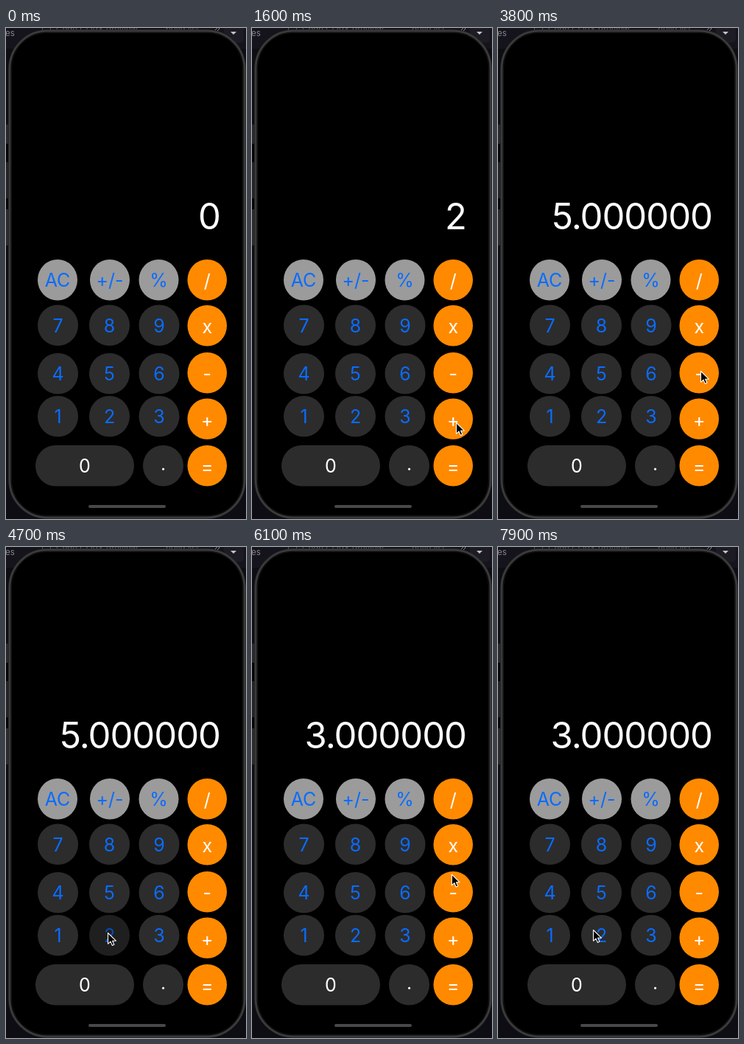
An HTML page for the animation above (8 s loop, 326 by 666 pixels).

```html
<!DOCTYPE html>
<html lang="en">
<head>
<meta charset="utf-8">
<title>Calculator</title>
<style>
  html, body { margin: 0; width: 100%; height: 100%; overflow: hidden; background: #15141c; }
  svg { display: block; width: 326px; height: 666px; }
  text { font-family: Inter, Roboto, sans-serif; }
  .key text { font-size: 25px; text-anchor: middle; }
  #display { font-size: 49px; letter-spacing: -1px; text-anchor: end; fill: #fff; }
  .back text { font-size: 11.5px; fill: #85848a; }
</style>
</head>
<body>
<svg viewBox="0 0 326 666">
  <g class="back">
    <rect width="326" height="666" fill="#15141c"/>
    <rect y="28" width="326" height="638" fill="#0d0d13"/>
    <rect y="131" width="4" height="26" fill="#29292d"/>
    <rect y="157" width="4" height="25" fill="#050506"/>
    <rect y="182" width="4" height="49" fill="#242427"/>
    <rect y="231" width="4" height="15" fill="#050506"/>
    <rect y="246" width="4" height="49" fill="#2b2b2e"/>
    <rect x="296" y="-8" width="27" height="28" rx="5" fill="#1d1c25"/>
    <text x="-1" y="11">es</text>
    <rect x="49.500" y="-5" width="11" height="11" rx="2" fill="none" stroke="#56555c"/>
    <text x="68" y="6" opacity=".6">Code COPY Preview</text>
    <text x="217" y="6" opacity=".6">build list</text>
    <path d="M282 5l6-6 2 2-6 6z" fill="none" stroke="#85848a"/>
    <path d="M305 5h8l-4 4z" fill="#c4c3c8"/>
  </g>
  <rect x="3" y="2" width="323" height="664" rx="53" fill="#1b1b1c"/>
  <rect x="5" y="4" width="319" height="660" rx="51" fill="#000" stroke="#3a3a3b" stroke-width="3"/>
  <rect x="7.500" y="6.500" width="314" height="655" rx="48" fill="#000" stroke="#151515"/>
  <text id="display" x="291" y="272.500">0</text>
  <g id="keys"></g>
  <rect x="112" y="647" width="105" height="4" rx="2" fill="#484848"/>
  <path id="cursor" d="M.5 .5V15.300L4 12.100L6.300 17.400L8.900 16.300L6.600 11.200H11.300Z"
        fill="#000" stroke="#fff" stroke-width="1.100" stroke-linejoin="round"/>
</svg>
<script>
const LOOP = 8000, STEP = 100;
const GRAY = '#9b9b9b', DARK = '#2c2c2c', ORANGE = '#ff8a00', BLUE = '#0a6cff', WHITE = '#fff';
const keysBox = document.getElementById('keys');
const display = document.getElementById('display');
const cursor = document.getElementById('cursor');
const keys = {};

function make(tag, attrs, parent) {
  const el = document.createElementNS('http://www.w3.org/2000/svg', tag);
  for (const name in attrs) el.setAttribute(name, attrs[name]);
  return parent.appendChild(el);
}

function addKey(label, x, y, width, fill, color, dy = 0) {
  const g = make('g', { class: 'key' }, keysBox);
  make('rect', { x, y, width, height: 55.5, rx: 27.5, fill }, g);
  make('text', { x: x + width / 2, y: y + 37 + dy, fill: color }, g).textContent = label;
  keys[label] = g;
}

addKey('AC', 43, 314, 54, GRAY, BLUE);
addKey('+/-', 114, 314, 54, GRAY, BLUE);
addKey('%', 180.5, 314, 54, GRAY, BLUE);
[['789', 375.5], ['456', 441], ['123', 499]].forEach(([row, y]) =>
  [...row].forEach((n, i) => addKey(n, [43, 113, 180.5][i], y, 55, DARK, BLUE)));
addKey('0', 40, 566, 134, DARK, WHITE);
addKey('.', 186, 566, 55, DARK, WHITE, -3);
[['/', 314], ['x', 376], ['-', 440], ['+', 502.5], ['=', 566]].forEach(([op, y]) =>
  addKey(op, 246.5, y, 53.5, ORANGE, WHITE, 1));

// time, value shown from then on
const values = [[0, '0'], [900, '2'], [2200, '3'], [2900, '5.000000'], [4800, '2'], [5600, '3.000000']];

const presses = [[800, '2'], [1300, '+'], [2100, '3'], [2800, '='],
                 [3900, '-'], [4700, '2'], [5500, '='], [7000, '/']];

// time, x, y of the pointer tip
const path = [
  [100, -14, 596], [700, 137, 523], [900, 137, 523], [1200, 276, 533], [1600, 277, 535],
  [1800, 277, 535], [2050, 208, 524], [2200, 208, 524], [2450, 270, 604], [2600, 276, 583],
  [2900, 276, 583], [3600, 275, 466], [3800, 275, 465], [4000, 275, 465], [4500, 138, 523],
  [4800, 138, 523], [5300, 280, 590], [5500, 279, 591], [5700, 279, 591], [6300, 268, 392],
  [6800, 273, 348], [7100, 273, 348], [7700, 125, 519], [7800, 125, 519], [7900, 129, 519]
];

function pointAt(t) {
  const i = path.findIndex(p => p[0] > t);
  if (i < 0) return path[path.length - 1].slice(1);
  if (i === 0) return path[0].slice(1);
  const [t0, x0, y0] = path[i - 1], [t1, x1, y1] = path[i];
  const u = (t - t0) / (t1 - t0), e = u * u * (3 - 2 * u);
  return [x0 + (x1 - x0) * e, y0 + (y1 - y0) * e];
}

// held down for one step, then fading back
function dimAt(age) {
  return age < 0 || age >= 300 ? 0 : Math.min(1, (300 - age) / 200) * 0.28;
}

function draw(now) {
  const t = Math.floor((now % LOOP) / STEP) * STEP;
  display.textContent = values.filter(v => v[0] <= t).pop()[1];
  const dim = {};
  for (const [at, label] of presses) dim[label] = Math.max(dim[label] || 0, dimAt(t - at));
  for (const label in dim) keys[label].setAttribute('opacity', 1 - dim[label]);
  cursor.setAttribute('transform', `translate(${pointAt(t)})`);
}

let start;
function tick(now) {
  start ??= now;
  draw(now - start);
  requestAnimationFrame(tick);
}
draw(0);
requestAnimationFrame(tick);
</script>
</body>
</html>
```
